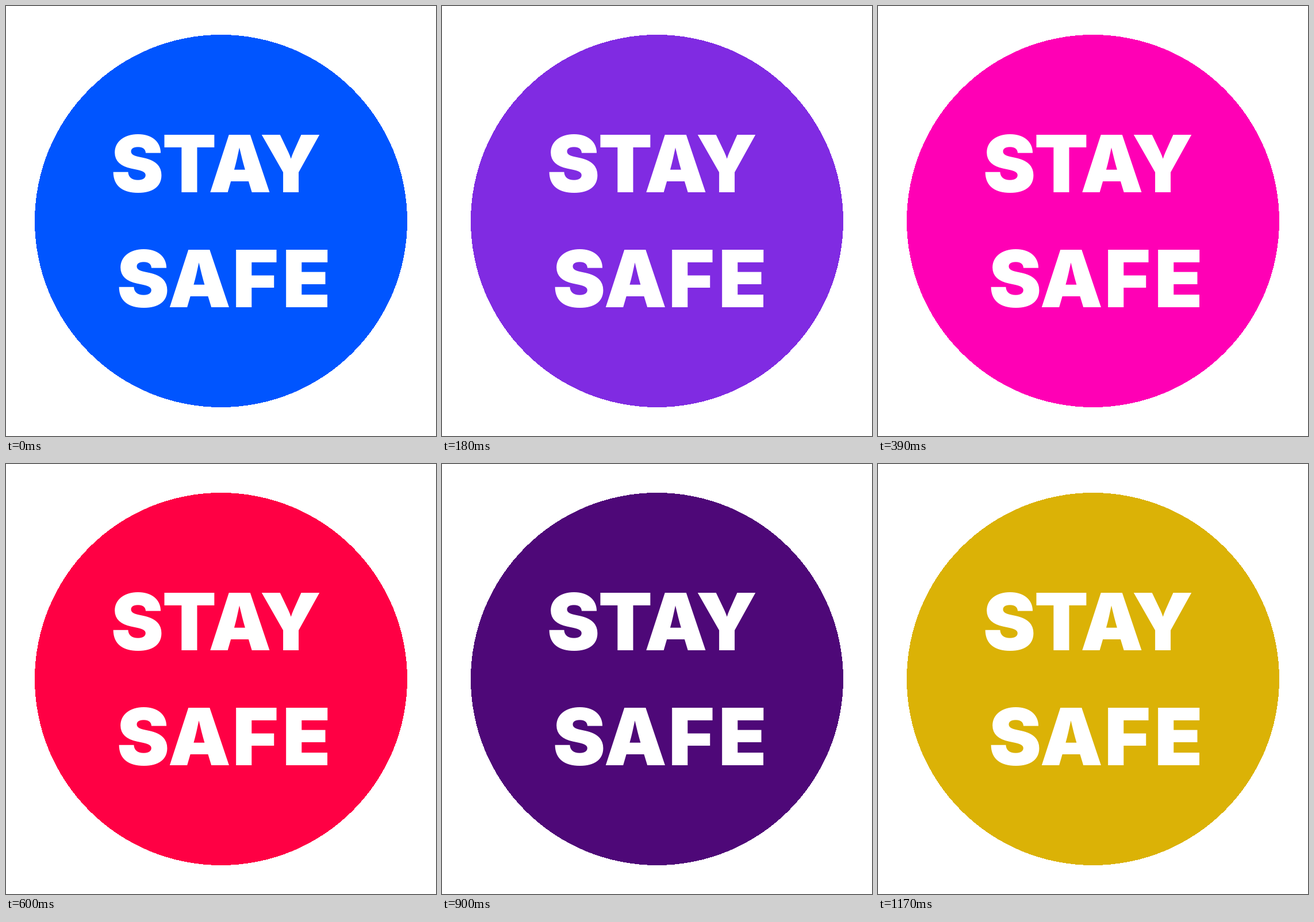
Recreate the animation shown at these times as an HTML page. Size 748 px wide and 748 px high, loop 1470 ms.

```html
<!DOCTYPE html>
<html lang="en">
<head>
<meta charset="utf-8">
<title>Stay safe</title>
<style>
  html, body { margin: 0; width: 100%; height: 100%; overflow: hidden; background: #fff; }
  svg { display: block; width: 100vw; height: 100vh; }
  text {
    font: 900 137.5px Inter, sans-serif;
    font-optical-sizing: none;
    text-anchor: middle;
    fill: #fff;
  }
</style>
</head>
<body>
<svg viewBox="0 0 748 748">
  <circle id="disc" cx="374" cy="374" r="324" fill="#0055ff" shape-rendering="crispEdges"/>
  <text x="228.5 319 407 495" y="324">STAY</text>
  <text x="238.5 336.5 434 523" y="524">SAFE</text>
</svg>
<script>
  const LOOP = 1470, STEP = 30, LAST = 39;

  // [step, red, green, blue]
  const stops = [
    [0, 0, 85, 255],
    [12, 255, 0, 197],
    [22.7, 255, 0, 25],
    [29.6, 72, 0, 125],
    [LAST, 219, 178, 6]
  ];

  function colorAt(step) {
    const i = Math.max(1, stops.findIndex(s => s[0] >= step));
    const [a, ...from] = stops[i - 1];
    const [b, ...to] = stops[i];
    const k = (step - a) / (b - a);
    return `rgb(${from.map((v, c) => Math.round(v + (to[c] - v) * k))})`;
  }

  const disc = document.getElementById('disc');
  const start = performance.now();

  function draw() {
    const time = (performance.now() - start) % LOOP;
    // The colour moves in steps and rests on the last one.
    disc.setAttribute('fill', colorAt(Math.min(LAST, Math.floor(time / STEP))));
    requestAnimationFrame(draw);
  }
  draw();
</script>
</body>
</html>
```
